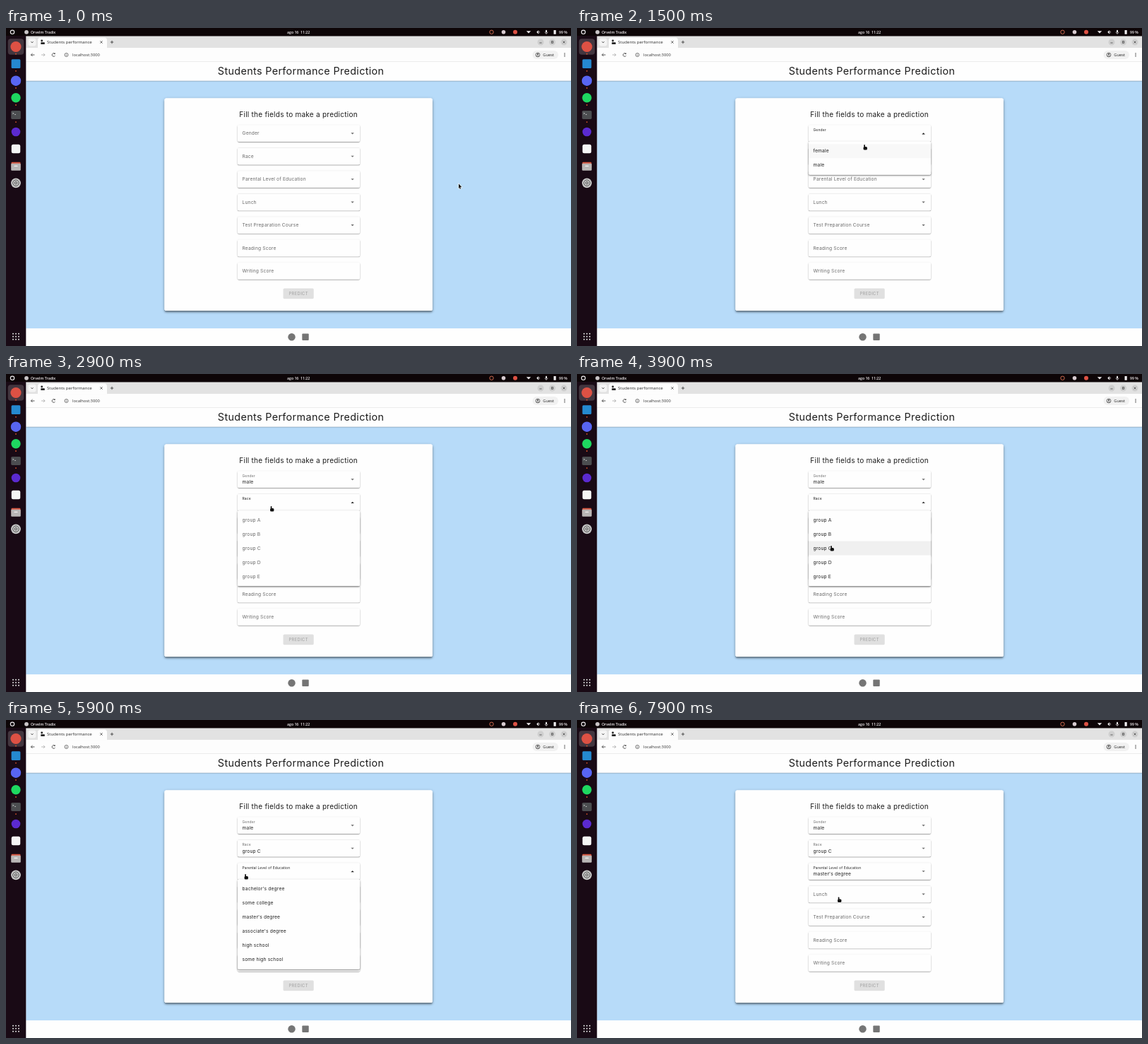
Write an HTML page with a canvas that moves like this. It is 800 px wide and 450 px high and loops after 8 s.

```html
<!DOCTYPE html>
<html lang="en">
<head>
<meta charset="utf-8">
<title>Students performance</title>
<style>
html, body { margin: 0; width: 100%; height: 100%; overflow: hidden; background: #fff; }
canvas { display: block; width: 800px; height: 450px; }
</style>
</head>
<body>
<canvas id="stage"></canvas>
<script>
const LOOP = 8000, TRAVEL = 450;
const canvas = document.getElementById('stage');
const ctx = canvas.getContext('2d');
const dpr = window.devicePixelRatio || 1;
canvas.width = 800 * dpr;
canvas.height = 450 * dpr;

const UI = 'Inter, sans-serif';
const SYS = '"Open Sans", "Noto Sans", sans-serif';
const LEFT = 328, WIDTH = 173, TEXT_X = 334.5;
const FIELD_H = 23.3, ITEM_H = 20, PAD = 3.35;
const WHITE = '#fefefe', INK = '#333';

const fields = [
  { label: 'Gender', open: 1000, close: 2100, pick: 1, items: ['female', 'male'] },
  { label: 'Race', open: 2720, close: 4720, pick: 2, items: [...'ABCDE'].map(c => 'group ' + c) },
  { label: 'Parental Level of Education', open: 5400, close: 7150, pick: 2,
    items: ['bachelor\'s degree', 'some college', 'master\'s degree',
            'associate\'s degree', 'high school', 'some high school'] },
  { label: 'Lunch', select: true },
  { label: 'Test Preparation Course', select: true },
  { label: 'Reading Score' },
  { label: 'Writing Score' }
];
fields.forEach((f, i) => {
  f.y = 137.5 + i * 32.47;
  f.next = (fields[i + 1] || {}).open || LOOP;
  f.menuH = f.items ? f.items.length * ITEM_H + 2 * PAD : 0;
});

// where the pointer rests, and when it gets there
const rest = { x: 641, y: 220.5 };
const stops = [
  { at: 900, x: 409, y: 147 }, { at: 1500, x: 407, y: 165 },
  { at: 1950, x: 352, y: 190 }, { at: 2650, x: 375.5, y: 187 },
  { at: 3500, x: 360, y: 243 }, { at: 5250, x: 339, y: 218 },
  { at: 6550, x: 358.5, y: 281 }, { at: 7800, x: 370.5, y: 250.5 }
];

const clamp = v => Math.max(0, Math.min(1, v));
const mix = (a, b, p) => a + (b - a) * p;
const smooth = v => { v = clamp(v); return v * v * (3 - 2 * v); };
const slowDown = (v, power) => 1 - Math.pow(1 - clamp(v), power);
const speedUp = v => Math.pow(clamp(v), 1.6);

function pointer(t) {
  return stops.reduce((p, s) => {
    const k = smooth((t - s.at) / TRAVEL + 1);
    return { x: mix(p.x, s.x, k), y: mix(p.y, s.y, k) };
  }, rest);
}

function text(s, x, y, size, color, o = {}) {
  ctx.font = `${o.weight || 400} ${size}px ${o.font || UI}`;
  ctx.letterSpacing = (o.gap === undefined ? 0.025 : o.gap) * size + 'px';
  ctx.textAlign = o.align || 'left';
  ctx.fillStyle = color;
  ctx.fillText(s, x, y);
}
const sysText = (s, x, y, size, color, weight = 400) =>
  text(s, x, y, size, color, { font: SYS, weight, gap: 0 });

function rect(x, y, w, h, color, r = 0) {
  ctx.fillStyle = color;
  ctx.beginPath();
  ctx.roundRect(x, y, w, h, r);
  ctx.fill();
}
const square = (x, y, size, color, r = 1.5) =>
  rect(x - size / 2, y - size / 2, size, size, color, r);
const disc = (x, y, r, color) => square(x, y, 2 * r, color, r);

// a white sheet whose shadow falls only outside its edge
function raised(x, y, w, h, r, depth) {
  ctx.save();
  ctx.beginPath();
  ctx.rect(0, 0, 800, 450);
  ctx.roundRect(x, y, w, h, r);
  ctx.clip('evenodd');
  for (let k = 0; k < 3; k++) {
    ctx.shadowColor = `rgba(0,0,0,${0.26 - 0.05 * k})`;
    ctx.shadowOffsetY = depth * (0.9 - 0.25 * k) * dpr;
    ctx.shadowBlur = depth * (0.8 + 0.7 * k) * dpr;
    rect(x, y, w, h, WHITE, r);
  }
  ctx.restore();
  rect(x, y, w, h, WHITE, r);
}

function ring(x, y, r, color, w = 0.8, from = 0, to = 7) {
  ctx.strokeStyle = color;
  ctx.lineWidth = w;
  ctx.beginPath();
  ctx.arc(x, y, r, from, to);
  ctx.stroke();
}

function line(x1, y1, x2, y2, color = INK, w = 0.8) {
  ctx.strokeStyle = color;
  ctx.lineWidth = w;
  ctx.beginPath();
  ctx.moveTo(x1, y1);
  ctx.lineTo(x2, y2);
  ctx.stroke();
}

function cross(x, y, r) {
  line(x - r, y - r, x + r, y + r, INK, 0.7);
  line(x + r, y - r, x - r, y + r, INK, 0.7);
}

function chevron(x, y, r, turn, color = INK) {
  ctx.save();
  ctx.translate(x, y);
  ctx.rotate(turn);
  line(-r, -r, 0.2, 0.2, color);
  line(r, -r, -0.2, 0.2, color);
  ctx.restore();
}

function triangle(x, y, r, turn, color) {
  ctx.save();
  ctx.translate(x, y);
  ctx.rotate(turn);
  ctx.fillStyle = color;
  ctx.beginPath();
  ctx.moveTo(-r, -r / 2);
  ctx.lineTo(r, -r / 2);
  ctx.lineTo(0, r / 2);
  ctx.fill();
  ctx.restore();
}

function topBar() {
  const y = 5.8, pale = '#f0eef0';
  const label = (s, x) => sysText(s, x, 7.8, 5.2, pale, 600);
  rect(0, 0, 800, 11.5, '#0d0507');
  ring(9, y, 2.7, pale, 1.1);
  disc(29, y, 2.9, '#c9c5c7');
  label('Orvelm Tradix', 35);
  label('ago 16', 398);
  label('11:22', 417);
  ring(687.5, y, 2.7, '#cf6a4f', 1);
  disc(704.5, y, 2.8, '#d8cbd0');
  disc(721, y, 3, '#dd5144');
  triangle(740, y, 3.2, 0, pale);
  triangle(752.5, y, 2.6, Math.PI / 2, pale);
  ring(752.5, y, 2.8, pale, 0.7, -0.7, 0.7);
  rect(764, 2.8, 2, 3.8, pale, 1);
  ring(765, y - 0.2, 2, pale, 0.6, 0, Math.PI);
  line(765, 7.6, 765, 9, pale, 0.6);
  rect(775.5, 3, 3.2, 5.8, pale, 0.6);
  label('99 %', 783);
}

function dock() {
  const x = 14, pitch = 24.1, slot = i => 26.5 + i * pitch;
  rect(0, 11, 28.3, 439, '#190a15');
  square(x, slot(0), 22.5, '#43363f', 4);
  disc(x, slot(0), 7.6, '#dd5144');
  square(x, slot(1), 12.8, '#2589d0');
  disc(x, slot(2), 7.2, '#5865f2');
  disc(x, slot(3), 6.7, '#1ed760');
  rect(x - 6.8, slot(4) - 6, 13.6, 12, '#4b4d50', 1.6);
  chevron(x - 3.4, slot(4) - 2, 1.2, -Math.PI / 2, pale = '#e6e6e6');
  line(x - 2, slot(4) - 0.5, x, slot(4) - 0.5, pale, 0.7);
  disc(x, slot(5), 6.3, '#5b2ad0');
  square(x, slot(6), 12.5, '#f5f5f5', 2.5);
  rect(x - 6.5, slot(7) - 5.5, 13, 8, '#d65742', 1.2);
  rect(x - 6.8, slot(7) - 3.5, 13.6, 10, '#b9b6b6', 1.2);
  rect(x - 2.5, slot(7) - 0.5, 5, 1.3, '#f2f2f2', 0.5);
  disc(x, slot(8), 6.9, '#c9c9c9');
  for (const r of [1.7, 4.3]) ring(x, slot(8), r, '#4c4c4c', 1);
  for (let i = 0; i < 5; i++) disc(x, slot(i) + 10.2, 0.9, '#e2542a');
  for (let i = 0; i < 9; i++)
    square(10 + (i % 3) * 4, 432.6 + Math.floor(i / 3) * 4, 1.8, '#efedee', 0.5);
}

function backArrow(x, y, turn, color) {
  line(x - 2.5, y, x + 2.5, y, color);
  chevron(x + 2.5 * -Math.cos(turn), y, 2, turn + Math.PI / 2, color);
}

function tabStrip() {
  const y = 20;
  rect(28.3, 11.3, 772, 17, '#e2e2e2');
  square(37, y, 11, '#f4f4f4', 3);
  chevron(37, y + 0.8, 1.6, 0);
  rect(45, 13.5, 98, 15, '#fdfdfd', [4, 4, 0, 0]);
  rect(49.3, y + 0.2, 5.5, 2.8, '#222', 0.6);
  disc(50.7, y - 2, 1.4, '#222');
  sysText('Students performance', 58, 22.1, 6.1, '#2b2b2b');
  cross(135, y, 1.7);
  line(147.8, y, 152.2, y);
  line(150, y - 2.2, 150, y + 2.2);
  for (let i = 0; i < 3; i++) disc(757 + 16.5 * i, y, 4.5, '#cfcfcf');
  line(755.4, y + 1, 758.6, y + 1, INK, 0.7);
  ctx.strokeRect(772.3, y - 1.2, 2.4, 2.4);
  cross(790, y, 1.4);
}

function toolbar() {
  const y = 38;
  rect(28.3, 28.3, 772, 19, '#fdfdfd');
  backArrow(38, y, 0, INK);
  backArrow(52.5, y, Math.PI, '#aaa');
  ring(67.5, y, 2.3, INK, 0.8, 0.5, 5.6);
  triangle(69, y - 1.6, 1.4, Math.PI * 1.75, INK);
  ring(85.5, y, 2.5, '#444', 0.7);
  line(85.5, y - 0.4, 85.5, y + 1.4, '#444', 0.7);
  disc(85.5, y - 1.3, 0.4, '#444');
  sysText('localhost:3000', 94, 40.1, 5.75, INK);
  rect(745.5, 32, 36.5, 12, '#f1f1f1', 6);
  ring(753, y, 2.9, INK, 0.7);
  disc(753, y - 0.9, 1, INK);
  ring(753, y + 3, 2, INK, 0.7, Math.PI * 1.2, Math.PI * 1.8);
  sysText('Guest', 760.3, 40.1, 5.8, '#222', 500);
  for (let i = -1; i < 2; i++) disc(791, y + 2 * i, 0.65, INK);
}

function page() {
  const centered = (s, x, y, size, color, o) => text(s, x, y, size, color, { align: 'center', ...o });
  rect(28.3, 47, 772, 378.3, '#b7dbf9');
  raised(28.3, 47, 780, 27.4, 0, 1);
  rect(28.3, 47, 772, 0.7, '#dcdcdc');
  centered('Students Performance Prediction', 417.6, 66.3, 14.35, '#1c1c1c');
  rect(28.3, 425.2, 772, 25, WHITE);
  disc(404.5, 437.2, 5.2, '#757575');
  square(424, 437.2, 9.4, '#757575', 1);

  raised(224.5, 99.5, 379.3, 300.5, 2.6, 2.5);
  centered('Fill the fields to make a prediction', 414.1, 126.2, 10, '#1c1c1c');
  rect(392.5, 368.4, 43.2, 14.8, '#e0e0e0', 1.6);
  centered('PREDICT', 414.2, 378, 5.8, '#a9a9a9', { weight: 500, gap: 0.065 });
}

const black = a => `rgba(0,0,0,${a})`;

function drawField(f, t) {
  raised(LEFT, f.y, WIDTH, FIELD_H, 1.7, 1);
  const up = f.open ? smooth((t - f.open) / 150) : 0;
  const focus = f.open && t >= f.open && t < f.next;
  text(f.label, TEXT_X, mix(f.y + 13.8, f.y + 8.3, up), mix(6.67, 5, up), black(focus ? 0.88 : 0.58));
  if (f.open && t >= f.close) text(f.items[f.pick], TEXT_X, f.y + 17.9, 6.67, black(0.87));
  if (f.select || f.open) {
    const turn = f.open ? smooth((t - f.open) / 200) - smooth((t - f.close) / 200) : 0;
    triangle(490.6, f.y + 11.8, 2.2, Math.PI * turn, black(mix(0.58, 0.92, turn)));
  }
}

// highlight fades over the last 200 ms of pointer positions
function hover(f, i, t) {
  const top = f.y + FIELD_H + PAD + i * ITEM_H;
  let sum = 0;
  for (let k = 0; k < 10; k++) {
    const past = t - k * 20, { y } = pointer(past);
    if (past > f.open && y >= top && y < top + ITEM_H) sum++;
  }
  return sum / 10;
}

function drawMenu(f, t) {
  const age = t - f.open, gone = t - f.close;
  if (!f.open || age < 0 || gone > 125) return;
  const show = gone >= 0 ? 1 - speedUp(gone / 125) : slowDown(age / 225, 4);
  const ink = gone >= 0 ? 1 - clamp(gone / 50) : clamp((slowDown(age / 450, 3) - 0.33) / 0.67);
  const scale = mix(FIELD_H / f.menuH, 1, show);
  const top = f.y + FIELD_H;
  ctx.save();
  ctx.globalAlpha = show;
  raised(LEFT, top, WIDTH, f.menuH * scale, 1.7, 1.7);
  ctx.translate(0, top);
  ctx.scale(1, scale);
  ctx.globalAlpha = show * ink;
  f.items.forEach((item, i) => {
    const y = PAD + i * ITEM_H;
    rect(LEFT, y, WIDTH, ITEM_H, black(0.055 * hover(f, i, t)));
    text(item, TEXT_X, y + 12.2, 6.67, black(0.87));
  });
  ctx.restore();
}

function overControl({ x, y }, t) {
  return x >= LEFT && x <= LEFT + WIDTH && fields.some(f => {
    const menu = t >= f.open && t < f.close ? f.menuH : 0;
    return y >= f.y && y <= f.y + FIELD_H + menu;
  });
}

function drawPointer(t) {
  const p = pointer(t);
  ctx.save();
  ctx.translate(p.x, p.y);
  ctx.beginPath();
  if (overControl(p, t)) {
    ctx.roundRect(-0.8, 0, 1.7, 5, 0.8);
    ctx.roundRect(-1.5, 3, 5.4, 4.6, 1.5);
  } else {
    ctx.lineTo(0, 0);
    ctx.lineTo(0, 6.4);
    ctx.lineTo(1.6, 5.2);
    ctx.lineTo(4.2, 4.6);
    ctx.closePath();
    ctx.roundRect(1.5, 4.4, 1.3, 2.8, 0.4);
  }
  ctx.strokeStyle = 'rgba(255,255,255,0.9)';
  ctx.lineWidth = 1.2;
  ctx.stroke();
  ctx.fillStyle = '#111';
  ctx.fill();
  ctx.restore();
}

function draw(t) {
  ctx.setTransform(dpr, 0, 0, dpr, 0, 0);
  rect(0, 0, 800, 450, WHITE);
  page();
  tabStrip();
  toolbar();
  topBar();
  dock();
  fields.forEach(f => drawField(f, t));
  fields.forEach(f => drawMenu(f, t));
  drawPointer(t);
}

let pale;
const start = performance.now();
function tick() {
  draw((performance.now() - start) % LOOP);
  requestAnimationFrame(tick);
}
tick();
</script>
</body>
</html>
```
